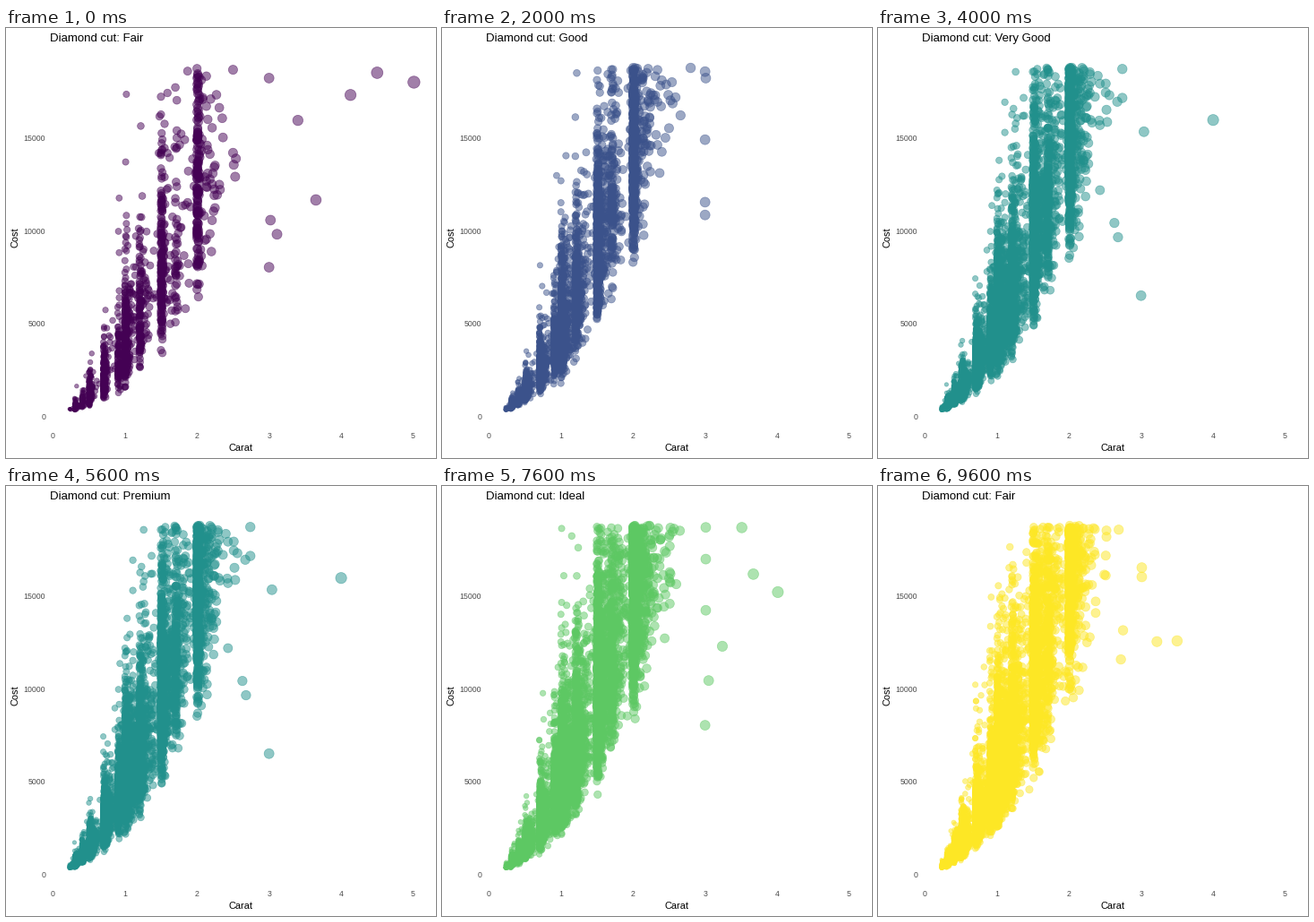
Recreate the animation shown at these times as a matplotlib script. Size 480 by 480 pixels, loop 10 s.

```python
import numpy as np
import matplotlib.pyplot as plt
from matplotlib.animation import FuncAnimation

SIZE, DPI = 480, 72
STEP_MS, HOLD = 400, 5          # each cut stays for five steps
X0, X_UNIT = 52.3, 80.45        # pixel position of carat 0, pixels per carat
Y0, Y_UNIT = 433.5, 20.7        # pixel position of cost 0, pixels per thousand
COST_MIN, COST_MAX = .326, 18.823
GREY = "#4D4D4D"

# Stones crowd just above popular weights.
POPULAR = np.array([.23, .3, .4, .5, .7, .9, 1, 1.2, 1.5, 1.7, 2, 2.5])
SHARE = np.array([1, 10, 6, 12, 16, 8, 26, 11, 18, 4, 18, 1])


def to_x(carat):
    return X0 + X_UNIT * carat


def to_y(cost):
    return Y0 - Y_UNIT * cost


def radius(carat):
    size = 1 + 5 * np.sqrt(np.clip(carat - .2, 0, None) / 4.81)
    return .375 * (2.845 * size + .94)


def make_stones(seed, n, lean, tight, unit_cost, sigma, large):
    """Return carats and costs in thousands.

    lean tilts the weights to heavy stones, tight is the part that sits right
    at a popular weight, unit_cost is the median for one carat.
    """
    rng = np.random.default_rng(seed)
    share = SHARE * POPULAR ** lean
    base = rng.choice(POPULAR, n, p=share / share.sum())
    scale = np.where(rng.random(n) < tight, .012, .08 * base)
    carat = np.round(base + rng.exponential(scale), 2)

    # Cost grows as a power of weight, with a slightly skewed log-normal spread.
    z = rng.normal(size=n)
    spread = sigma * (1 - .25 * np.abs(np.log(carat)))
    cost = unit_cost * carat ** 1.75 * np.exp(spread * (z + .06 * z ** 2))
    keep = (cost > COST_MIN) & (cost < COST_MAX)

    big_carat, big_cost = np.array(large).T
    return np.append(carat[keep], big_carat), np.append(cost[keep], big_cost)


fair = make_stones(
    1, 1700, lean=0, tight=.7, unit_cost=3.8, sigma=.39,
    large=[(5.01, 18.02), (4.5, 18.53), (4.13, 17.33), (3.4, 15.96),
           (3.65, 11.67), (3.0, 18.24), (3.0, 8.04), (3.11, 9.82),
           (3.02, 10.58)])
good = make_stones(
    2, 4500, lean=0, tight=.6, unit_cost=4.5, sigma=.31,
    large=[(3.0, 18.59), (3.01, 18.24), (2.8, 18.79), (3.0, 14.92),
           (3.0, 11.55), (3.0, 10.86), (2.66, 16.23)])
very_good = make_stones(
    3, 8000, lean=-.3, tight=.5, unit_cost=4.8, sigma=.31,
    large=[(4.0, 15.98), (3.04, 15.35), (3.0, 6.51), (2.74, 17.17),
           (2.68, 9.66), (2.63, 10.43)])
premium = make_stones(
    4, 9500, lean=0, tight=.45, unit_cost=4.8, sigma=.32,
    large=[(3.51, 18.7), (3.67, 16.19), (4.01, 15.22), (3.24, 12.3),
           (3.01, 18.71), (3.01, 17.0), (3.01, 14.24), (3.0, 8.04),
           (3.05, 10.45)])
ideal = make_stones(
    5, 10500, lean=-.5, tight=.4, unit_cost=5.3, sigma=.32,
    large=[(3.5, 12.59), (3.22, 12.55), (3.01, 16.54), (3.01, 16.04),
           (2.72, 11.59), (2.75, 13.16)])

CUTS = [("Fair", "#440154", fair), ("Good", "#3B528B", good),
        ("Very Good", "#21908C", very_good), ("Premium", "#5DC863", premium),
        ("Ideal", "#FDE725", ideal)]

plt.rcParams["font.family"] = "Liberation Sans"
fig = plt.figure(figsize=(SIZE / DPI, SIZE / DPI), dpi=DPI, facecolor="white")
ax = fig.add_axes([0, 0, 1, 1])
ax.set(xlim=(0, SIZE), ylim=(SIZE, 0))
ax.axis("off")


def label(x, y, text, size, color="black", **kw):
    return ax.text(x, y, text, fontsize=size, color=color, va="baseline", **kw)


for carat in range(6):
    label(to_x(carat), 458, str(carat), 8.8, GREY, ha="center")
for cost in range(0, 16, 5):
    label(44, to_y(cost) + 3.2, str(cost * 1000), 8.8, GREY, ha="right")
label(261.8, 472, "Carat", 11, ha="center")
label(13, 234, "Cost", 11, ha="center", rotation=90, rotation_mode="anchor")
title = label(49, 15, "", 13.2)

clouds = [
    ax.scatter(to_x(carat), to_y(cost), s=(2 * radius(carat)) ** 2,
               facecolors=color, edgecolors=color, linewidths=.7, alpha=.5,
               visible=False)
    for _, color, (carat, cost) in CUTS
]


def draw(i):
    # The title switches one step before the points do.
    title.set_text("Diamond cut: " + CUTS[(i + 1) // HOLD % len(CUTS)][0])
    for k, cloud in enumerate(clouds):
        cloud.set_visible(k == i // HOLD)
    return [title, *clouds]


anim = FuncAnimation(fig, draw, frames=HOLD * len(CUTS), interval=STEP_MS,
                     repeat=True, repeat_delay=0, blit=False)
plt.show()
```
